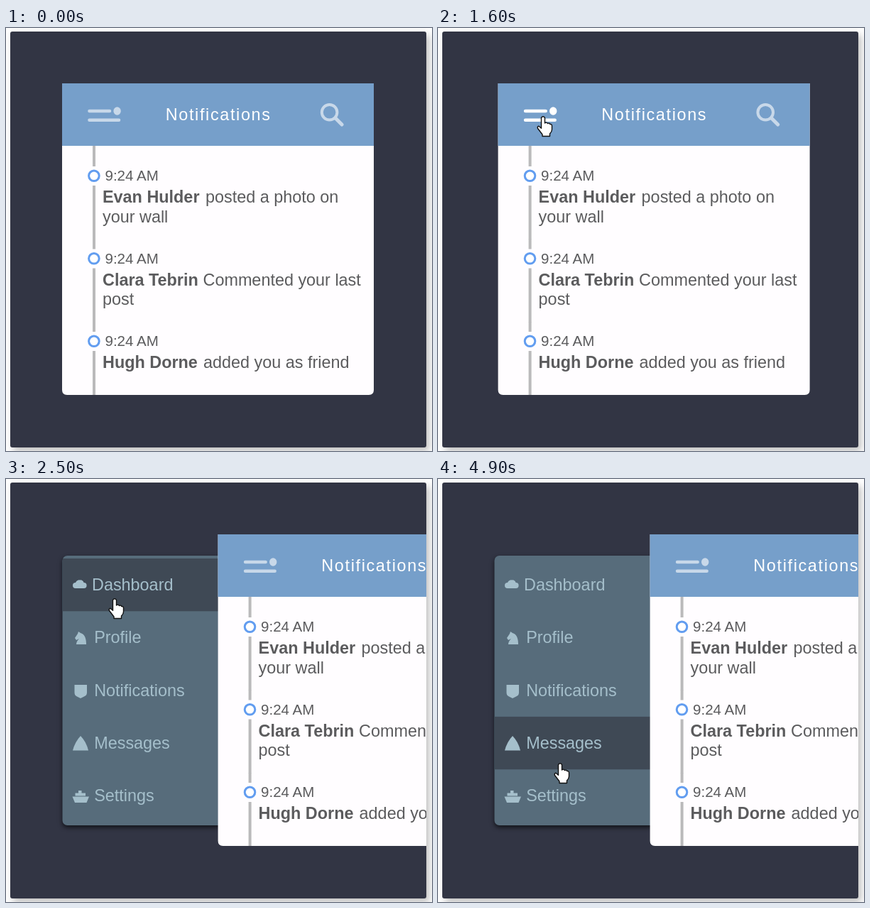
An HTML page for the animation above (5 s loop, 600 by 596 pixels).

```html
<!DOCTYPE html>
<html lang="en">
<head>
<meta charset="utf-8">
<title>Notifications menu</title>
<style>
html, body { margin: 0; width: 100%; height: 100%; overflow: hidden; background: #fdfdfd; }
svg { display: block; width: 600px; height: 596px; font: 23.4px "Liberation Sans", Arial, sans-serif; }
.card { fill: #323544; filter: drop-shadow(4px 5px 5px rgba(0, 0, 0, .24)); }
.menu-bg { fill: #576c7b; filter: drop-shadow(0 3px 3px rgba(0, 0, 0, .65)); }
#hover { fill: #3f4955; }
#menu g { fill: #a5bfcb; }
#feed { fill: #5b5b5d; }
.time { font-size: 20.5px; }
.line { stroke: #bababb; stroke-width: 4; }
.dot { fill: #fff; stroke: #629df0; stroke-width: 3; }
.title { fill: #fff; letter-spacing: 1.65px; }
.icon { stroke: #fff; fill: none; stroke-linecap: round; }
#burger, .search { opacity: .6; }
#cursor path { fill: #fff; stroke: #111; stroke-width: 1.4; stroke-linejoin: round; }
</style>
</head>
<body>
<svg viewBox="0 0 600 596">
  <clipPath id="stage"><rect x="6" y="5" width="586" height="586" rx="3"/></clipPath>
  <rect class="card" x="6" y="5" width="586" height="586" rx="3"/>
  <g clip-path="url(#stage)">
    <g id="menu">
      <rect class="menu-bg" x="79.5" y="108" width="226" height="380" rx="7"/>
      <rect id="hover" x="80" width="226" height="74.3"/>
      <g id="items">
        <path d="M98 154a4 4 0 0 1 0-8q2-4 6-3.6q4-.6 5.600 3.600a4 4 0 0 1 0 8Z"/>
        <path d="M99 233q0-4 4-8l-4 2-2-3 4-6 1-3 3 2q8 2 8 16Z"/>
        <path d="M96.500 290h17.500v11q0 4-4 5.500l-5 2.500-5-2.500q-3.500-1.500-3.500-5.500Z"/>
        <path d="M94 382.500q3-12 11-20.500 8 8 11 20.500Z"/>
        <path d="M93.500 447.500H117L113.500 456H97ZM97.500 446.500V442.500H102V439H106.500V442.500H112V446.500Z"/>
      </g>
    </g>
    <g id="panel">
      <path fill="#fffdff" d="M79 78H518V510q0 7-7 7H86q-7 0-7-7Z"/>
      <path fill="#769fca" d="M79 78H518V166H79Z"/>
      <text class="title" x="224.700" y="130">Notifications</text>
      <g id="burger">
        <path class="icon" stroke-width="4.600" d="M117.500 117H146M117.500 129.700H159"/>
        <ellipse cx="156.600" cy="117" rx="5.200" ry="5.700" fill="#fff"/>
      </g>
      <g class="icon search">
        <circle cx="455.600" cy="118.800" r="10.800" stroke-width="4"/>
        <path id="handle" stroke-width="5" d="M465 128L473 136"/>
      </g>
      <g id="feed"></g>
    </g>
    <g id="cursor">
      <path id="hand" d="M-2.500 1.500Q0-2 2.500 1.500V9q2-2 4 .6 2-1.300 3.300 1 2.700-.6 2.700 2.400v5q0 3-3 6v3.500H-1V25l-6.500-8.500q-1-3 1.500-3.300l3.500 3Z"/>
      <path id="arrow" d="M0 0V21L5 16.500 8.500 24 12 22.500 8.500 15H15Z"/>
    </g>
  </g>
</svg>
<script>
const $ = id => document.getElementById(id);
const LOOP = 5000, STEP = 100, ROW = 74.3, ROW_TOP = 112;

const labels = ["Dashboard", "Profile", "Notifications", "Messages", "Settings"];
$("items").innerHTML += labels.map((label, i) =>
  `<text x="${i ? 124.2 : 121}" y="${157 + i * ROW}">${label}</text>`).join("");

// name, start of the message, first line, second line
const posts = [
  ["Evan Hulder", 281, "posted a photo on", "your wall"],
  ["Clara Tebrin", 277.5, "Commented your last", "post"],
  ["Hugh Dorne", 278, "added you as friend", ""]
];
$("feed").innerHTML = posts.map(([name, x, first, second], i) => {
  const y = 208 + i * 116.5;
  return `<path class="line" d="M124 ${i ? y - 27 : 166}V${y - 13}M124 ${y + 14}V${i < 2 ? y + 90 : 517}"/>
    <circle class="dot" cx="123.900" cy="${y + .3}" r="7.300"/>
    <text class="time" x="139.500" y="${y + 7}">9:24 AM</text>
    <text x="136" y="${y + 38}"><tspan font-weight="bold">${name}</tspan><tspan x="${x}">${first}</tspan></text>
    <text x="136" y="${y + 65.5}">${second}</text>`;
}).join("");

// pointer path: time, x, y
const path = [
  [100, 566, 565], [600, 462, 120], [800, 462, 120], [1300, 148, 125],
  [1900, 148, 125], [2500, 153, 169], [3300, 161, 247], [4000, 167, 285],
  [4200, 169, 350], [4500, 174, 521], [4800, 172, 405], [4900, 172, 401]
];

function pointer(t) {
  let i = 1;
  while (i < path.length - 1 && path[i][0] < t) i++;
  const [t0, x0, y0] = path[i - 1], [t1, x1, y1] = path[i];
  const k = Math.min(1, Math.max(0, (t - t0) / (t1 - t0)));
  return [x0 + (x1 - x0) * k, y0 + (y1 - y0) * k];
}

// CSS "ease": cubic-bezier(.25, .1, .25, 1)
function ease(x) {
  if (x <= 0) return 0;
  if (x >= 1) return 1;
  const curve = (a, b, s) => 3 * a * s * (1 - s) ** 2 + 3 * b * s * s * (1 - s) + s ** 3;
  let lo = 0, hi = 1;
  for (let i = 0; i < 20; i++) {
    const mid = (lo + hi) / 2;
    if (curve(.25, .25, mid) < x) lo = mid; else hi = mid;
  }
  return curve(.1, 1, lo);
}

const show = (id, on) => $(id).setAttribute("visibility", on ? "visible" : "hidden");
const move = (id, x, y) => $(id).setAttribute("transform", `translate(${x} ${y})`);

function draw(t) {
  const open = ease((t - 1575) / 600);
  move("panel", 219.6 * open, 0);
  move("menu", 20 * (1 - open), 0);

  const [x, y] = pointer(t);
  const row = t >= 1900 ? Math.floor((y - ROW_TOP) / ROW) : -1;
  const onRow = row >= 0 && row < labels.length;
  const onBurger = t < 1900 && x < 165 && y < 145;
  const onSearch = t < 1900 && x > 440 && y < 140;
  const hand = onRow || onBurger || onSearch;

  move("cursor", x, y);
  show("hand", t >= 100 && hand);
  show("arrow", t >= 100 && !hand);
  show("hover", onRow);
  $("hover").setAttribute("y", ROW_TOP + row * ROW);
  $("burger").style.opacity = onBurger ? 1 : .6;
  show("handle", t < 600 || t >= 1600);
}

const start = performance.now();
function tick() {
  const t = (performance.now() - start) % LOOP;
  draw(Math.floor(t / STEP) * STEP);
  requestAnimationFrame(tick);
}
tick();
</script>
</body>
</html>
```
